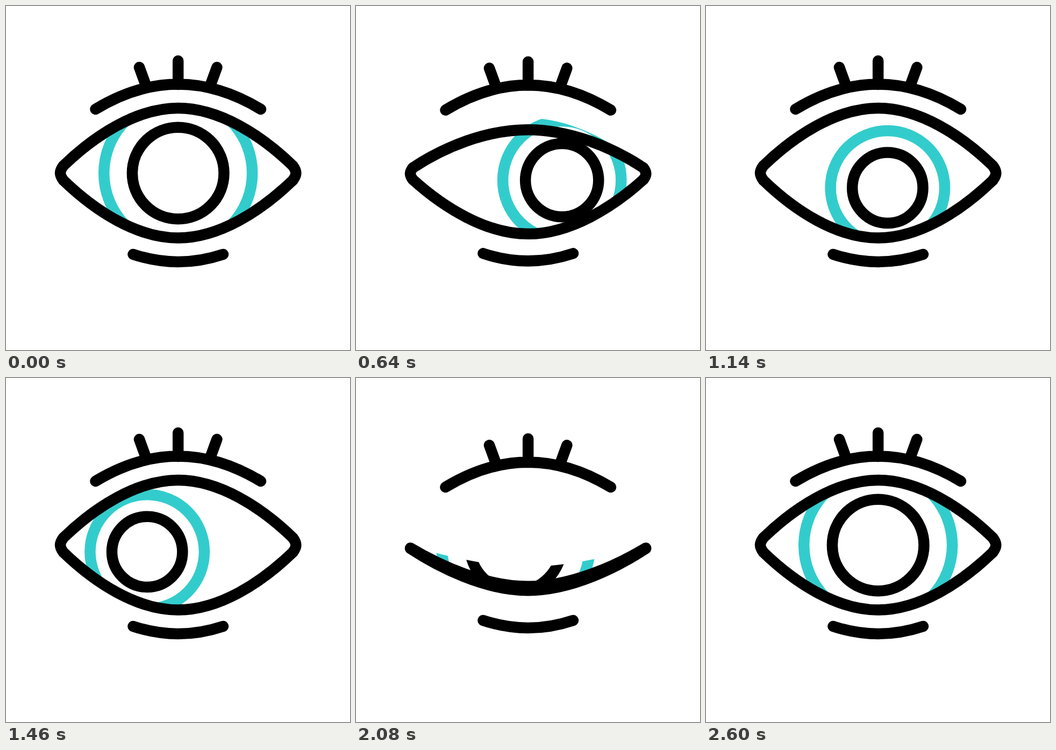
These frames come from a looping animation (640 px wide and 640 px high, 2800 ms). An HTML page:

```html
<!DOCTYPE html>
<html lang="en">
<head>
<meta charset="utf-8">
<title>Blinking eye</title>
<style>
  html, body { margin: 0; width: 100%; height: 100%; overflow: hidden; background: #fff; }
  svg { display: block; width: 100vw; height: 100vh; }
</style>
</head>
<body>
<svg viewBox="0 0 640 640" fill="none" stroke="#000" stroke-width="20.5" stroke-linecap="round" stroke-linejoin="round">
  <clipPath id="opening"><path id="mask"/></clipPath>
  <g clip-path="url(#opening)">
    <circle id="iris" stroke="#33cccc"/>
    <circle id="pupil"/>
  </g>
  <path id="lids"/>
  <path id="brow" d="M166.500 192Q320.200 99 474 192M248 114L260 147M320.200 102V146M392.400 114L380.400 147"/>
  <path id="bag" d="M236.500 462Q320.200 490 404 462"/>
</svg>
<script>
const LOOP = 2800;
const el = id => document.getElementById(id);
const mix = (a, b, k) => a + (b - a) * k;

function ease(t, from, to) {
  const u = Math.min(1, Math.max(0, (t - from) / (to - from)));
  return u * u * (3 - 2 * u);
}

const blink = (t, shut, shutEnd, open, openEnd) =>
  ease(t, shut, shutEnd) * (1 - ease(t, open, openEnd));

// Left half of each lid: tip, corner control, corner, two controls, apex
const UPPER = [[101, 311], [101, 305], [107, 297], [165, 241], [243, 190], [320.2, 190]];
const LOWER = UPPER.map(([x, y]) => [x, 621.5 - y]);
const CLOSED = [[101, 317], [101, 317], [101, 317], [155, 352], [240, 394], [320.2, 394]];

function lid(open, k) {
  const left = open.map(([x, y], i) => [mix(x, CLOSED[i][0], k), mix(y, CLOSED[i][1], k)]);
  const right = left.map(([x, y]) => [640.4 - x, y]);
  return { left, right };
}

function eyePath(upper, lower) {
  const a = lid(UPPER, upper), b = lid(LOWER, lower);
  const out = p => `Q${p[1]} ${p[2]}C${p[3]} ${p[4]} ${p[5]}`;
  const back = p => `C${p[4]} ${p[3]} ${p[2]}Q${p[1]} ${p[0]}`;
  return `M${a.left[0]}${out(a.left)}${back(a.right)}${out(b.right)}${back(b.left)}Z`;
}

// Glance right, sweep down and across to the left, then return to centre
function gaze(t) {
  if (t < 780) {
    const k = ease(t, 200, 764);
    return [mix(320.2, 392, k), mix(311, 326, k)];
  }
  if (t < 1690) {
    const k = ease(t, 790, 1640);
    return [mix(392, 246, k), mix(326, 315, k) + 70 * k * (1 - k)];
  }
  const k = ease(t, 1700, 2305);
  return [mix(246, 320.2, k), mix(315, 311, k)];
}

function ring(id, [x, y], r) {
  const c = el(id);
  c.setAttribute('cx', x);
  c.setAttribute('cy', y);
  c.setAttribute('r', r);
}

function draw(now) {
  const t = now % LOOP;
  const shut = blink(t, 200, 455, 455, 715) + blink(t, 1680, 1940, 2054, 2314);
  // The mask reopens slightly ahead of the lid
  const cover = blink(t, 200, 455, 391, 698) + blink(t, 1680, 1940, 1990, 2297);
  el('lids').setAttribute('d', eyePath(shut, shut));
  el('mask').setAttribute('d', eyePath(cover, shut));

  const size = 1 - 0.23 * (ease(t, 200, 764) - ease(t, 1720, 2060));
  const centre = gaze(t);
  ring('iris', centre, 138 * size);
  ring('pupil', centre, 85.3 * size);

  const shift = 11.5 * shut ** 1.2;
  el('brow').setAttribute('transform', `translate(0 ${shift})`);
  el('bag').setAttribute('transform', `translate(0 ${-shift})`);
}

const start = performance.now();
function tick() {
  draw(performance.now() - start);
  requestAnimationFrame(tick);
}
tick();
</script>
</body>
</html>
```
